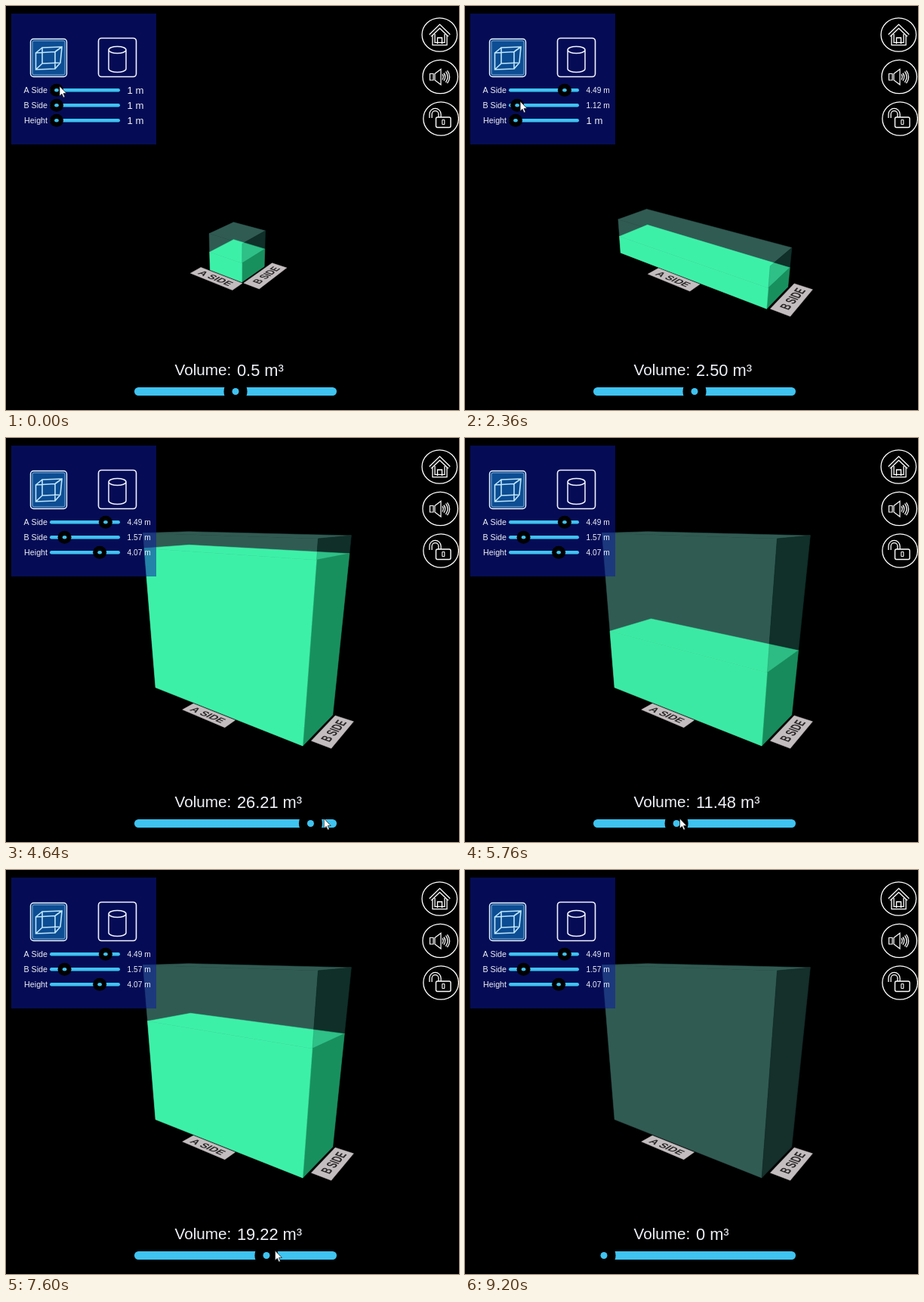
An HTML page with a canvas for the animation above (9720 ms loop, 600 by 534 pixels).

```html
<!DOCTYPE html>
<html lang="en">
<head>
<meta charset="utf-8">
<title>Volume of a box</title>
<style>
  html, body { margin: 0; height: 100%; overflow: hidden; background: #000; }
  canvas { display: block; }
</style>
</head>
<body>
<canvas id="stage" width="600" height="534"></canvas>
<script>
const ctx = document.getElementById('stage').getContext('2d');
const LOOP = 9720, CYAN = '#3fc3f0', WATER = '#3df0a8';
const FONT = '"Liberation Sans", Arial, sans-serif';
const ROWS = { a: 111.3, b: 131.3, h: 151.3 };

// Slider drags: start, end, slider, value reached
const drags = [
  [200, 1400, 'a', 4.49],
  [2230, 2683, 'b', 1.568],
  [2950, 3414, 'h', 4.072],
  [4252, 4780, 'fill', 1],
  [5050, 5650, 'fill', .35],
  [5650, 6300, 'fill', 1],
  [7102, 8320, 'fill', .1],
  [8320, 9100, 'fill', 0],
];

const mix = (a, b, p) => a + (b - a) * p;
const thumbX = value => 67 + (value - 1) * 18.6;

function ease(from, to, t) {
  const p = Math.min(1, Math.max(0, (t - from) / (to - from || 1)));
  return p * p * (3 - 2 * p);
}

// Where the pointer holds a slider
function grip(key, value) {
  return key === 'fill' ? [178 + 266 * value, 503] : [thumbX(value) + 4, ROWS[key] - 5.3];
}

function sceneAt(t) {
  const scene = { a: 1, b: 1, h: 1, fill: .5, hand: grip('a', 1) };
  let free = 0;
  for (const [start, end, key, goal] of drags) {
    const reach = ease(free, start, t), next = grip(key, scene[key]);
    scene.hand = scene.hand.map((v, i) => mix(v, next[i], reach));
    if (t > start) {
      scene[key] = mix(scene[key], goal, ease(start, end, t));
      scene.hand = grip(key, scene[key]);
    }
    free = end;
  }
  return scene;
}

// Perspective camera looking down at the box centre
const FOCAL = 462, SIN = Math.sin(.33), COS = Math.cos(.33), EYE = 4.36;
function project(x, y, z) {
  const right = .069 + .797 * x - .595 * z;
  const ahead = 7.97 - .586 * x - .766 * z;
  const drop = EYE - y, depth = ahead * COS + drop * SIN;
  return [303 + FOCAL * right / depth, 267 - FOCAL * (ahead * SIN - drop * COS) / depth];
}

// The thin outline closes the seams between neighbouring faces
function poly(points, fill, edge = fill, width = .5) {
  ctx.beginPath();
  points.forEach(p => ctx.lineTo(...p));
  ctx.closePath();
  ctx.fillStyle = fill;
  ctx.fill();
  ctx.strokeStyle = edge;
  ctx.lineWidth = width;
  ctx.stroke();
}

function line(path, width = 1.4, color = '#fff') {
  ctx.lineWidth = width;
  ctx.strokeStyle = color;
  ctx.stroke(new Path2D(path));
}

function tube(path, width = 4.5) {
  line(path, width);
  line(path, width - 2.6, '#000');
}

function disc(x, y, rx, ry, fill) {
  ctx.beginPath();
  ctx.ellipse(x, y, rx, ry, 0, 0, 7);
  ctx.fillStyle = fill;
  ctx.fill();
}

function box(x, y, w, h, r, fill, stroke, width = 1.6) {
  ctx.beginPath();
  ctx.roundRect(x, y, w, h, r);
  if (fill) { ctx.fillStyle = fill; ctx.fill(); }
  if (stroke) { ctx.strokeStyle = stroke; ctx.lineWidth = width; ctx.stroke(); }
}

function text(str, x, y, size, align = 'left') {
  ctx.font = `${size}px ${FONT}`;
  ctx.textAlign = align;
  ctx.fillStyle = '#eef0f6';
  ctx.fillText(str, x, y);
}

function drawTank({ a, b, h, fill }) {
  const x = a / 2, z = b / 2, level = h * fill;
  const front = (lo, hi) => [project(-x, lo, z), project(x, lo, z), project(x, hi, z), project(-x, hi, z)];
  const side = (lo, hi) => [project(x, lo, z), project(x, lo, -z), project(x, hi, -z), project(x, hi, z)];
  const lid = y => [project(-x, y, z), project(x, y, z), project(x, y, -z), project(-x, y, -z)];
  poly(lid(h), '#305b53');
  poly(front(0, h), '#305b53');
  poly(side(0, h), '#152f2b');
  if (!fill) return;
  ctx.globalAlpha = Math.min(1, .79 + .42 * fill);
  poly(lid(level), WATER);
  poly(side(level, h), 'rgba(0,50,36,.25)');
  poly(side(0, level), '#18905e');
  poly(front(0, level), WATER);
  ctx.globalAlpha = 1;
}

// Ground label: text runs along (ux, uz), its height along (vx, vz)
function drawLabel(str, x0, x1, z0, z1, [ux, uz], [vx, vz]) {
  poly([project(x0, 0, z0), project(x1, 0, z0), project(x1, 0, z1), project(x0, 0, z1)], '#c4bdbf');
  const x = (x0 + x1) / 2, z = (z0 + z1) / 2, step = .01;
  const [cx, cy] = project(x, 0, z);
  const [px, py] = project(x + ux * step, 0, z + uz * step);
  const [qx, qy] = project(x + vx * step, 0, z + vz * step);
  ctx.save();
  ctx.transform(px - cx, py - cy, qx - cx, qy - cy, cx, cy);
  ctx.font = `bold 30px ${FONT}`;
  ctx.textAlign = 'center';
  ctx.fillStyle = '#2a2729';
  ctx.fillText(str, 0, 11);
  ctx.restore();
}

function drawSlider(label, value, y) {
  text(label, 55, y + 3.9, 10.7, 'right');
  box(58, y - 2.2, 93, 4.4, 2.2, CYAN);
  const x = thumbX(value);
  disc(x, y, 9, 8.5, '#000');
  disc(x, y, 2.8, 2.2, CYAN);
  if (value === 1) text('1 m', 160.5, y + 4.2, 13.2);
  else text(value.toFixed(2) + ' m', 160.5, y + 3.2, 10.2);
}

function drawPanel({ a, b, h }) {
  ctx.fillStyle = 'rgba(10,24,170,.5)';
  ctx.fillRect(7, 10, 192, 173);

  box(32.5, 43.5, 48, 50, 4, '#0b3a80', '#e8f4ff', 1.4);
  box(35, 46, 43, 45, 2, '#0c4d93', '#9cc8ea', .8);
  line('M39.5 62L65 60.5V83L39.5 84ZM48 55L74 54L72 75L48 76ZM39.5 62L48 55M65 60.5L74 54M65 83L72 75M39.5 84L48 76', 1.6, '#bfe6fb');

  box(122.5, 42.5, 50, 51, 4, null, '#f2f4ff');
  line('M136 58A11.5 4.5 0 0 1 159 58A11.5 4.5 0 0 1 136 58V83A11.5 4.5 0 0 0 159 83V58', 1.5, '#f2f4ff');

  drawSlider('A Side', a, ROWS.a);
  drawSlider('B Side', b, ROWS.b);
  drawSlider('Height', h, ROWS.h);
}

function drawButtons() {
  for (let i = 0; i < 3; i++) {
    ctx.beginPath();
    ctx.ellipse(574.3 + i * .9, 38 + i * 55.5, 23.3, 22.2, 0, 0, 7);
    ctx.lineWidth = 1.3;
    ctx.strokeStyle = '#fff';
    ctx.stroke();
  }
  tube('M566.5 37V50H582.5V37', 4.4);
  line('M571.5 50V42H577.5V50');
  tube('M562 39L574.5 27L587 39', 5);
  line('M561.5 89.5H566V98H561.5ZM568 89.5L576 83.5V104L568 98Z', 1.2);
  tube('M579 89.5Q582 93.5 579 98M583.5 86Q589 93.5 583.5 101.5', 3.8);
  tube('M562.5 148V143A6 6 0 0 1 574.5 143V147');
  box(569.5, 147, 19.5, 13.5, 2, '#000', '#fff', 1.4);
  box(577.8, 150.5, 3, 6, .5, null, '#fff', 1.1);
}

function drawVolume({ a, b, h, fill }) {
  const volume = a * b * h * fill;
  const amount = a === 1 ? '0.5' : fill ? volume.toFixed(2) : '0';
  text('Volume:', 223.5, 487.5, 20.7);
  text(amount + ' m³', 306, 489, 21.8);
  box(170, 504, 268, 11, 5.5, CYAN);
  const x = 184 + 240 * fill;
  disc(x, 509.5, 15.5, 15.5, '#000');
  disc(x, 509.5, 4.5, 4.5, CYAN);
}

function drawPointer(x, y) {
  const shape = [[0, 0], [0, 13], [3, 10.3], [5, 15], [7, 14.2], [5, 9.6], [9, 9.4]];
  poly(shape.map(([dx, dy]) => [x + dx, y + dy]), '#fff', '#111', .7);
}

function draw(t) {
  const scene = sceneAt(t), x = scene.a / 2, z = scene.b / 2;
  ctx.fillStyle = '#000';
  ctx.fillRect(0, 0, 600, 534);
  drawTank(scene);
  drawLabel('A SIDE', -.78, .54, z + .04, z + .43, [1, 0], [0, 1]);
  drawLabel('B SIDE', x + .06, x + .5, -.79, .51, [0, -1], [1, 0]);
  drawPanel(scene);
  drawButtons();
  drawVolume(scene);
  if (t < 9160) drawPointer(...scene.hand);
}

const start = performance.now();
function frame() {
  draw((performance.now() - start) % LOOP);
  requestAnimationFrame(frame);
}
frame();
</script>
</body>
</html>
```
